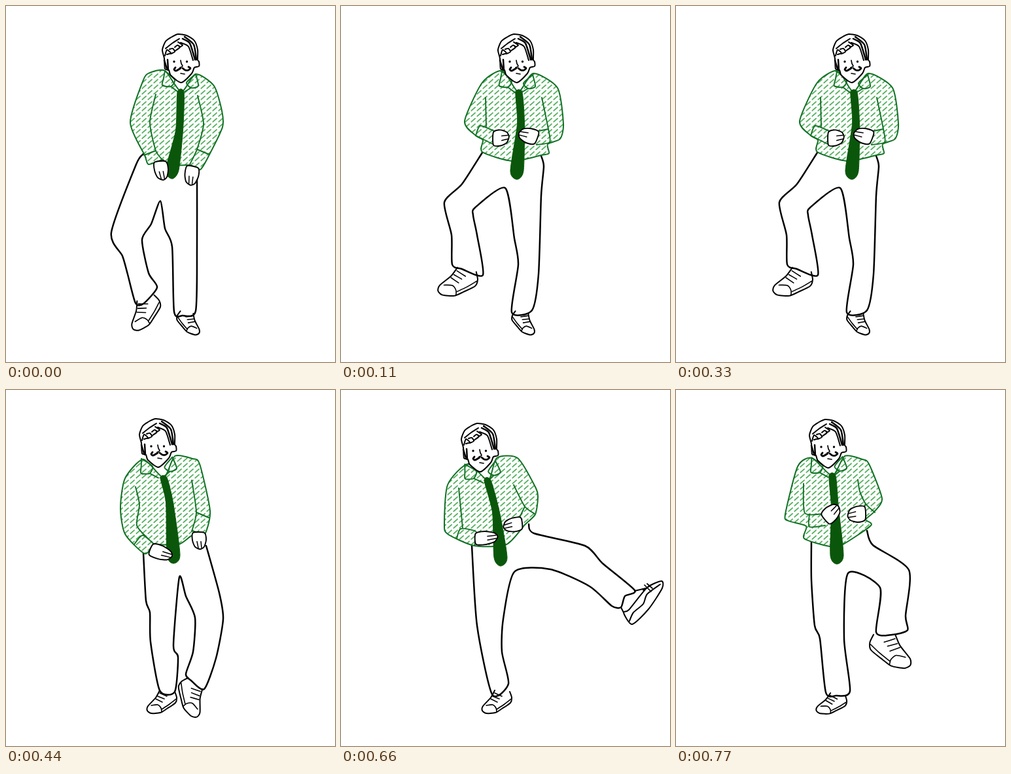
An HTML page that plays this animation: 503 px wide and 544 px high, repeating every 880 ms.

```html
<!DOCTYPE html>
<html lang="en">
<head>
<meta charset="utf-8">
<title>Kick dance</title>
<style>
html, body { margin: 0; width: 100%; height: 100%; overflow: hidden; background: #fff }
svg { display: block; width: 503px; height: 544px; stroke-linecap: round; stroke-linejoin: round }
</style>
</head>
<body>
<svg id="stage" viewBox="0 0 503 544">
  <defs>
    <pattern id="dashes" width="9" height="8.5" patternUnits="userSpaceOnUse">
      <rect width="9" height="8.5" fill="#fff"/>
      <path d="M1.2 7L7.2 1.8" stroke="#38a343" stroke-width="1.5"/>
    </pattern>
  </defs>
</svg>
<script>
const INK = '#000', GREEN = '#117024', TIE = '#0a570b';

// Strokes are separated by "/", a trailing "z" closes one; each runs smoothly through its points.
function curve(text) {
  return text.split('/').map(stroke => {
    const closed = stroke.endsWith('z');
    const points = stroke.match(/\S+,\S+/g).map(p => p.split(',').map(Number));
    const count = points.length;
    const at = i => closed ? points[(i + count) % count] : points[Math.max(0, Math.min(count - 1, i))];
    const mix = (p, from, to, k) => p.map((v, axis) => v + (to[axis] - from[axis]) * k);
    let d = 'M' + at(0);
    for (let i = 0; i < (closed ? count : count - 1); i++) {
      const p = at(i), q = at(i + 1);
      d += `C${mix(p, at(i - 1), q, .12)} ${mix(q, p, at(i + 2), -.12)} ${q}`;
    }
    return d + (closed ? 'z' : '');
  }).join('');
}

const draw = (text, stroke = INK, width = 2, fill = 'none') =>
  `<path d="${curve(text)}" stroke="${stroke}" stroke-width="${width}" fill="${fill}" vector-effect="non-scaling-stroke"/>`;

const place = (part, x, y, turn = 0, sx = 1, sy = Math.abs(sx)) =>
  `<g transform="translate(${x} ${y}) rotate(${turn}) scale(${sx} ${sy})">${part}</g>`;

const dot = (x, y) => `<circle cx="${x}" cy="${y}" r="1.7"/>`;

// Origin: between the eyes.
const face = draw('-25,-5 -28,-18 -23,-31 -15,-37 -4,-42 9,-40 21,-32 26,-18 26,-3 28,0 28,7 21,9 17,18 1,32 -15,21 -18,13 -24,11 z', INK, 2, '#fff');
const sideburns = draw('-20,-3 -19,13/-25,-2 -21,11/3,-35 14,-28 22,-3/6,-38 20,-26 24,-3', INK, 2.5);
const curls = draw('-24,-9 -21,-18 -15,-13 -21,-11/-15,-12 -9,-15 -12,-20 -17,-19/-9,-16 -1,-22 -5,-25 -9,-22/-2,-22 3,-25 -4,-30/-23,-20 -13,-28 -2,-35/0,-29 12,-23 19,-2');
const moustache = draw('0,10 -7,14 -10,12 -8,9/3,10 7,13 12,13 15,10 12,8', INK, 2.8);
const nose = draw('0,-2 1,3 3,7 -1,9/0,18 6,19', INK, 1.7);
const head = face + sideburns + curls + moustache + nose + dot(-10, 0) + dot(9.5, 0);

// Origin: the tie knot's top.
const collar = draw('-24,-21 -26,-10 -28,1 -15,3 -9,-7 -24,-21/-15,3 -3,12/23,-16 27,2 16,5 9,-3 23,-16/16,5 6,11', GREEN);

// Origin: the wrist, pointing down.
const hand = draw('-9,0 -10,13 -6,24 2,28 8,24 11,12 8,0 z', INK, 1.9, '#fff') +
  draw('-3,15 -1,26/3,15 4,26', INK, 1.5);

// Origin: the ankle, toe down and to the left.
const shoe = draw('-12,-1 -18,10 -30,23 -31,30 -25,34 -11,33 -1,27 12,18 14,10 11,1') +
  draw('-25,22 -15,21 -10,26 -9,32/-9,28 3,20 13,12/-12,3 -1,8/-15,8 -5,12/-18,12 -8,17', INK, 1.6);

function tie(kx, ky, mx, my, tx, ty) {
  const sides = [[kx, ky, 5], [mx, my, 5.5], [tx, ty - 13, 10]];
  const left = sides.map(([x, y, w]) => `${x - w},${y}`);
  const right = sides.map(([x, y, w]) => `${x + w},${y}`).reverse();
  return draw([...left, `${tx},${ty}`, ...right].join(' ') + ' z', TIE, 1, TIE);
}

const pants = text => draw(text, INK, 2.5);
const shirt = text => draw(text, GREEN, 2, 'url(#dashes)');
const seams = text => draw(text, GREEN, 1.9);
const rightShoe = place(shoe, 276, 468, 16, -.87);
const leftShoe = place(shoe, 247, 460);

const standLeft = () =>
  pants('210,226 199,242 161,346 178,382 186,410 198,454 210,455 231,430 218,408 208,357 222,333 236,298 243,340 254,368 257,467 270,473 290,466 292,370 292,251') +
  place(shoe, 214, 446, -24, 1.2) + rightShoe +
  shirt('243,99 220,102 210,113 190,178 212,228 218,242 240,235 246,244 281,243 297,250 311,227 331,185 330,160 318,122 290,104 268,131 z') +
  seams('229,135 220,178 229,221 240,236/211,228 229,221/293,137 302,180 292,219 281,242/292,219 311,227') +
  place(collar, 267, 120) + tie(267, 132, 265, 190, 254, 264) +
  place(hand, 236, 238, -5) + place(hand, 286, 246, 12) + place(head, 267, 85);

const kickLeft = () =>
  pants('223,211 204,236 148,264 138,272 76,299/73,313 85,345 142,326 155,315 246,286 265,342 256,461 265,469 286,464 305,390 303,277 306,244') +
  draw('39,267 25,288 32,330 55,361 66,342 50,300 46,272 z/50,294 70,295 75,303 73,313 65,325 63,336/65,352 87,344') +
  draw('55,298 57,311/61,297 62,311/67,297 67,312/58,304 74,293', INK, 1.7) + rightShoe +
  shirt('265,106 235,116 211,185 220,213 243,207 240,230 280,243 315,245 320,228 333,226 349,185 350,160 347,138 311,113 289,139 z') +
  seams('250,143 232,188 236,204/212,190 232,187/325,153 319,208 292,208/316,208 318,228 290,226') +
  place(collar, 289, 127, 2) + tie(288, 139, 286, 200, 267, 274) +
  place(hand, 230, 207, -20, .95, .85) + place(hand, 291, 214, 88, 1.25, .72) + place(head, 290, 92);

const kneeLeft = () =>
  pants('216,224 185,272 158,300 169,350 170,395 185,402 217,411 208,350 202,320 205,308 251,278 265,355 271,395 261,468 292,465 302,410 306,290 310,245 306,229') +
  place(shoe, 193, 403, 8, 1.28) + rightShoe +
  shirt('247,99 216,117 189,176 206,198 217,205 216,223 262,237 306,228 318,225 316,211 335,203 340,180 331,125 294,103 271,131 z') +
  seams('221,140 222,184/206,198 213,183 236,192/206,198 232,211/307,140 317,188 319,208 299,212/297,192 317,188') +
  place(collar, 270, 121) + tie(272, 132, 275, 180, 269, 265) +
  place(hand, 233, 202, -90, 1.15, .85) + place(hand, 299, 202, 110, 1.1, 1) + place(head, 268, 85);

const standRight = () =>
  pants('210,249 214,322 220,340 221,385 235,459 258,461 263,408 256,390 265,286 275,315 289,348 286,400 275,434 283,444 303,457 321,410 332,350 326,310 306,238') +
  place(shoe, 289, 448, 43, -1.2) + leftShoe +
  shirt('210,106 182,135 175,180 182,220 212,250 228,237 264,236 285,222 303,222 312,185 296,113 285,105 258,101 241,134 z') +
  seams('198,148 204,175 200,207 217,227/196,236 209,222 229,238/284,138 291,187 284,216/291,187 310,195/284,215 303,221') +
  place(collar, 234, 122, -9) + tie(241, 134, 250, 172, 256, 265) +
  place(hand, 222, 243, -68, 1, 1.2) + place(hand, 295, 218, 0, 1, .9) + place(head, 232, 86);

const kickRight = () =>
  pants('200,238 208,360 231,465 256,449 246,400 248,350 265,278 320,274 380,300 414,330 428,332 434,315 449,306 400,265 373,238 295,219 287,205') +
  draw('490,292 491,303 470,335 445,358 432,340 440,336 468,302 z/441,353 447,340 462,327 468,312 488,297/449,307 466,303/428,332 432,340') +
  draw('464,298 474,308/468,296 476,303/462,306 474,298', INK, 1.7) + leftShoe +
  shirt('194,113 163,145 158,205 163,220 204,238 253,236 281,206 297,190 301,165 298,150 270,104 238,104 225,138 z') +
  seams('180,150 186,211/177,227 183,212 207,217 204,238/264,145 281,178 296,189/281,178 272,197') +
  place(collar, 217, 129, -12) + tie(224, 138, 237, 187, 244, 269) +
  place(hand, 206, 227, -92, .95, 1.2) + place(hand, 276, 204, 83) + place(head, 212, 93);

const kneeRight = () =>
  pants('207,230 207,290 212,360 220,380 229,462 245,467 266,460 257,380 263,280 312,302 306,370 330,374 354,367 351,345 356,275 301,237 292,215') +
  place(shoe, 318, 374, 6, -1.45, 1.4) + place(shoe, 248, 465, 5, 1, .93) +
  shirt('208,104 186,117 167,190 172,200 199,208 196,227 235,239 255,236 298,207 290,198 303,186 315,166 295,113 285,106 258,101 239,131 z') +
  seams('195,143 197,188 226,189/204,190 204,209 228,207/278,137 281,155 290,174 304,187/290,174 284,184') +
  place(collar, 234, 121, -8) + tie(239, 131, 243, 180, 246, 266) +
  place(hand, 228, 197, -130, 1.1, 1) + place(hand, 289, 189, 88, 1.15, .95) + place(head, 232, 87);

const poses = [standLeft, kneeLeft, kickLeft, kneeLeft, standRight, kneeRight, kickRight, kneeRight];
const STEP_MS = 110;
const stage = document.getElementById('stage');
stage.insertAdjacentHTML('beforeend', poses.map(pose => `<g display="none">${pose()}</g>`).join(''));
const figures = stage.querySelectorAll(':scope > g');
const start = performance.now();

function show() {
  const elapsed = Math.max(0, performance.now() - start);
  const current = Math.floor(elapsed / STEP_MS) % poses.length;
  figures.forEach((figure, i) => figure.setAttribute('display', i === current ? 'inline' : 'none'));
  requestAnimationFrame(show);
}
show();
</script>
</body>
</html>
```
